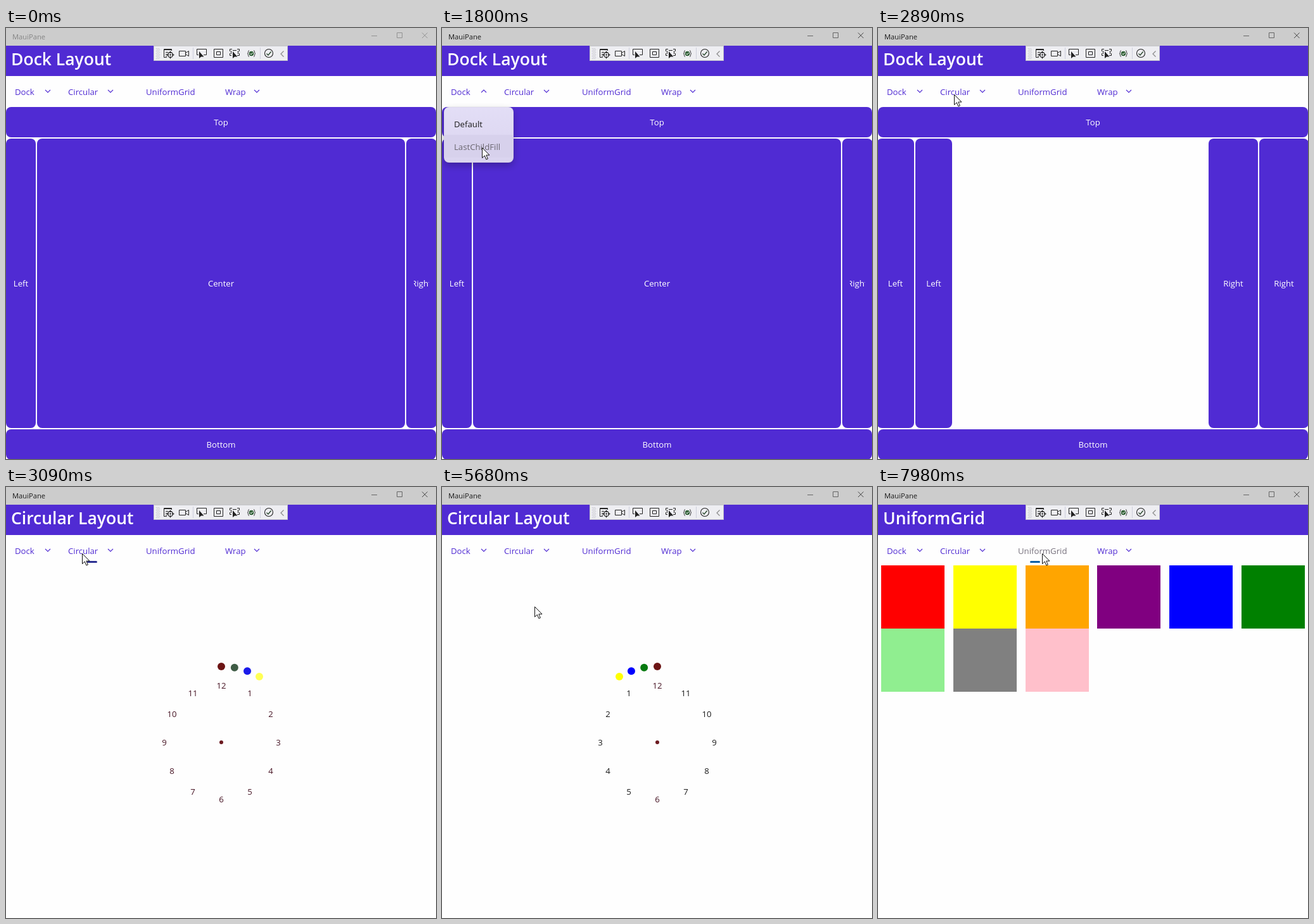
These frames come from a looping animation (679x682 px, 8 s). An HTML page with a canvas:

```html
<!DOCTYPE html>
<html lang="en">
<head>
<meta charset="utf-8">
<title>Layouts</title>
<style>
  html, body { margin: 0; width: 100%; height: 100%; overflow: hidden; background: #fefefe; }
  canvas { display: block; }
</style>
</head>
<body>
<canvas id="stage" width="679" height="682"></canvas>
<script>
const ctx = document.getElementById('stage').getContext('2d');
const LOOP = 8000;
const PURPLE = '#502bd3', PAPER = '#fefefe', INK = '#1b1b1b';
const FONT = '"Open Sans", "Noto Sans", sans-serif';

// Moments at which the interface changes state
const ACTIVATED = 850, UNFILLED = 1940, CIRCULAR = 3090, REVERSED = 5010, GRID = 7380;

const menus = [
  { x: 3, w: 110, items: ['Default', 'LastChildFill'], open: 990, close: UNFILLED,
    hover: 1600, press: 1760, fill: ['#e3def6', '#dad4ef'], row: '#d7d1ec' },
  { x: 87, w: 144, items: ['Clockwise', 'Counterclockwise'], open: 3230, close: REVERSED,
    hover: 4740, press: 4880, fill: ['#fbfbfb', '#f8f8f8'], row: '#f0f0f0' }
];
const clicks = [[780, 920], [1660, 1800], [2750, 2890], [4740, 4880], [7240, 7310]];
const pointerPath = [
  [200, 0, 515], [780, 58, 109], [1200, 58, 109], [1600, 63, 189], [2000, 63, 189],
  [2300, 83, 150], [2540, 114, 124], [2610, 120, 105], [3710, 120, 105],
  [4210, 146, 189], [6480, 146, 189], [7040, 259, 105]
];
const pointerShape = new Path2D('M.5 .5V16.6L4.3 13L6.9 19L9.4 18L6.8 12.1H12Z');
const arrowIcon = new Path2D('M0 0V11L3 8.4H7.5Z');

const clamp = v => Math.max(0, Math.min(1, v));
const between = (t, a, b) => t >= a && t < b;

function rect(x, y, w, h, color) {
  ctx.fillStyle = color;
  ctx.fillRect(x, y, w, h);
}
function rounded(x, y, w, h, r, color) {
  ctx.fillStyle = color;
  ctx.beginPath();
  ctx.roundRect(x, y, w, h, r);
  ctx.fill();
}
function disc(x, y, r, color) {
  ctx.fillStyle = color;
  ctx.beginPath();
  ctx.arc(x, y, r, 0, Math.PI * 2);
  ctx.fill();
}
function stroke(d, color, width = 1) {
  ctx.strokeStyle = color;
  ctx.lineWidth = width;
  ctx.stroke(new Path2D(d));
}
function text(s, x, y, color, size = 13.2, align = 'left', weight = 400) {
  ctx.font = `${weight} ${size}px ${FONT}`;
  ctx.textAlign = align;
  ctx.fillStyle = color;
  ctx.fillText(s, x, y);
}
function fillAt(path, x, y, color) {
  ctx.save();
  ctx.translate(x, y);
  ctx.fillStyle = color;
  ctx.fill(path);
  ctx.restore();
}

function drawWindow(t) {
  const active = t >= ACTIVATED;
  rect(0, 0, 679, 28, '#cccccc');
  text('MauiPane', 10, 18, active ? INK : '#858585', 11.2);
  const glyph = active ? '#666' : '#929292';
  stroke('M577 12.5H586M617.5 7.5H625.5V15.5H617.5Z', glyph);
  stroke('M657 7.5L665.5 16M665.5 7.5L657 16', active ? '#444' : glyph);
  rect(0, 28, 679, 48, PURPLE);
  const title = t < CIRCULAR ? 'Dock Layout' : t < GRID ? 'Circular Layout' : 'UniformGrid';
  text(title, 8, 59, '#fff', 26.5, 'left', 600);
}

function drawToolbar() {
  rect(233, 28, 212, 24, '#c2c3c8');
  rect(234, 29, 210, 22, '#eeeef2');
  for (let y = 32; y < 49; y += 2)
    for (let x = 237 + (y / 2) % 2; x < 243; x += 2) rect(x, y, 1, 1, '#b4b4bc');
  rect(295, 31, 1, 18, '#cccedb');
  rect(401, 31, 1, 18, '#cccedb');
  const dark = '#222';
  stroke('M254 46.5H249.5V33.5H261.5V36M249 34.5H262M252 38.5H256M252 41.5H254M252 44.5H254', dark);
  stroke('M263.5 42.5A4 4 0 1 1 255.5 42.5A4 4 0 1 1 263.5 42.5M259.5 36.5V40M259.5 45V48.5M253.5 42.5H257M262 42.5H265.5', dark, 1.3);
  disc(259.5, 42.5, 1.2, dark);
  stroke('M273.5 36.5H283.5V44.5H273.5ZM283.5 39.5L288.5 36.5V44.5L283.5 41.5', dark);
  stroke('M304 42.5H301.5V33.5H316.5V42.5H312', dark);
  fillAt(arrowIcon, 305, 37, dark);
  stroke('M328.5 33.5H342.5V46.5H328.5ZM332.5 37.5H338.5V42.5H332.5Z', dark);
  stroke('M353.5 37V33.5H357M365 33.5H368.5V37M353.5 40V43.5H356M365 43.5H368.5V40M358 35.5H364M355.5 36V41M366.5 36V41', dark);
  fillAt(arrowIcon, 358, 37, dark);
  stroke('M384 35.5Q382.5 35.5 382.5 38T381 40.5Q382.5 40.5 382.5 43T384 45.5M391 35.5Q392.5 35.5 392.5 38T394 40.5Q392.5 40.5 392.5 43T391 45.5', '#444');
  disc(387.5, 40.5, 3.8, '#35633b');
  stroke('M385.5 40.5L387 42L389.8 39', '#fff');
  stroke('M421.5 40A6.5 6.5 0 1 1 408.5 40A6.5 6.5 0 1 1 421.5 40', dark, 1.1);
  stroke('M411.5 40.5L414 43L418.5 37.5', '#2b4a2f', 1.4);
  stroke('M438.5 36.5L434 41L438.5 45.5', '#8a8a8a', 1.2);
}

function chevron(x, up) {
  const s = up ? -1 : 1;
  stroke(`M${x - 4} ${100 - 2 * s}L${x} ${100 + 2 * s}L${x + 4} ${100 - 2 * s}`, PURPLE, 1.1);
}
function drawTabs(t) {
  const isOpen = m => between(t, m.open, m.close);
  text('Dock', 14, 106, PURPLE);
  chevron(66, isOpen(menus[0]));
  text('Circular', 98, 106, PURPLE);
  chevron(165, isOpen(menus[1]));
  text('UniformGrid', 221, 106, t >= GRID ? '#77717d' : PURPLE);
  text('Wrap', 346, 106, PURPLE);
  chevron(396, false);
  if (between(t, CIRCULAR, REVERSED)) rounded(128, 117, 16, 3, 1.5, t < 3570 ? '#2c3192' : '#1f5c8c');
  if (t >= GRID) rounded(240, 117, 16, 3, 1.5, '#0b5ea6');
}

function panel(label, x, y, w, h, padding = 0) {
  rounded(x, y, w, h, 8, PURPLE);
  ctx.save();
  ctx.beginPath();
  ctx.rect(x + padding, y, w - 2 * padding, h);
  ctx.clip();
  text(label, x + w / 2, y + h / 2 + 5, '#fff', 13.2, 'center');
  ctx.restore();
}
function drawDock(t) {
  panel('Top', 0, 125, 679, 48);
  panel('Bottom', 0, 635, 679, 48);
  const column = (label, x, w) => panel(label, x, 175, w, 458, 12);
  if (t < UNFILLED) {
    column('Left', 0, 47);
    column('Center', 49, 581);
    column('Right', 632, 48);
  } else {
    column('Left', -2, 59);
    column('Left', 59, 58);
    column('Right', 522, 78);
    column('Right', 602, 78);
  }
}

function drawClock(t) {
  const reversed = t >= REVERSED, side = reversed ? -1 : 1;
  const polar = (degrees, r) => {
    const a = degrees * Math.PI / 180;
    return [340 + side * r * Math.sin(a), 404 - r * Math.cos(a)];
  };
  for (let hour = 1; hour <= 12; hour++) {
    const [x, y] = polar(hour * 30, 90);
    const color = !reversed || hour % 6 === 0 ? '#481626' : INK;
    text(hour, x, y + 5, color, 13.2, 'center');
  }
  const dots = reversed ? ['#6c1414', '#087a10', '#0000ff', '#ffff00']
                        : ['#6c1414', '#3f5c45', '#1a1aea', '#ffff55'];
  dots.forEach((color, i) => disc(...polar(i * 10, 120), 6, color));
  disc(340, 404, 3, '#6c1a20');
}

function drawGrid() {
  const colors = ['red', 'yellow', 'orange', 'purple', 'blue', 'green', 'lightgreen', 'gray', 'pink'];
  colors.forEach((color, i) =>
    rect(Math.round(5 + i % 6 * 113.8), 124 + 100 * Math.floor(i / 6), 100, 100, color));
}

function drawMenu(menu, t, click) {
  const fade = 1 - clamp((t - menu.close) / 140);
  if (t < menu.open || fade === 0) return;
  const grow = 1 - (1 - clamp((t - menu.open) / 220)) ** 3;
  const h = 44 + 44 * grow;
  ctx.save();
  ctx.globalAlpha = fade;
  const fill = ctx.createLinearGradient(0, 125, 0, 213);
  menu.fill.forEach((color, i) => fill.addColorStop(i, color));
  ctx.shadowColor = 'rgba(0,0,0,.24)';
  ctx.shadowBlur = 12;
  ctx.shadowOffsetY = 5;
  rounded(menu.x, 125, menu.w, h, 8, fill);
  ctx.shadowColor = 'transparent';
  ctx.beginPath();
  ctx.roundRect(menu.x, 125, menu.w, h, 8);
  ctx.strokeStyle = 'rgba(0,0,0,.06)';
  ctx.lineWidth = 1;
  ctx.stroke();
  ctx.clip();
  if (t >= menu.hover) rect(menu.x + 1, 169, menu.w - 2, 36, menu.row);
  if (click) drawClick(click);
  menu.items.forEach((item, i) => {
    const pressed = i === 1 && t >= menu.press;
    text(item, menu.x + 16, 157 + 36 * i - 44 * (1 - grow), pressed ? '#6b6770' : INK);
  });
  ctx.restore();
}

function pointerAt(t) {
  if (t < pointerPath[0][0]) return null;
  const next = pointerPath.findIndex(p => p[0] > t);
  if (next < 0) return pointerPath.at(-1).slice(1);
  const [t0, x0, y0] = pointerPath[next - 1], [t1, x1, y1] = pointerPath[next];
  const k = (t - t0) / (t1 - t0), e = k * k * (3 - 2 * k);
  return [Math.round(x0 + (x1 - x0) * e), Math.round(y0 + (y1 - y0) * e)];
}
function drawClick([x, y]) {
  disc(x + .5, y + .5, 12.5, 'rgba(242,240,60,.8)');
}
function drawPointer([x, y]) {
  ctx.save();
  ctx.translate(x, y);
  ctx.fillStyle = '#fff';
  ctx.fill(pointerShape);
  ctx.strokeStyle = '#111';
  ctx.lineWidth = 1;
  ctx.stroke(pointerShape);
  ctx.restore();
}

function render(t) {
  const pointer = pointerAt(t);
  const click = clicks.some(([a, b]) => between(t, a, b)) ? pointer : null;
  rect(0, 0, 679, 682, PAPER);
  drawWindow(t);
  drawToolbar();
  if (click) drawClick(click);
  drawTabs(t);
  if (t < CIRCULAR) drawDock(t);
  else if (t < GRID) drawClock(t);
  else drawGrid();
  menus.forEach(menu => drawMenu(menu, t, click));
  if (pointer) drawPointer(pointer);
}

function tick() {
  render(performance.now() % LOOP);
  requestAnimationFrame(tick);
}
tick();
</script>
</body>
</html>
```
